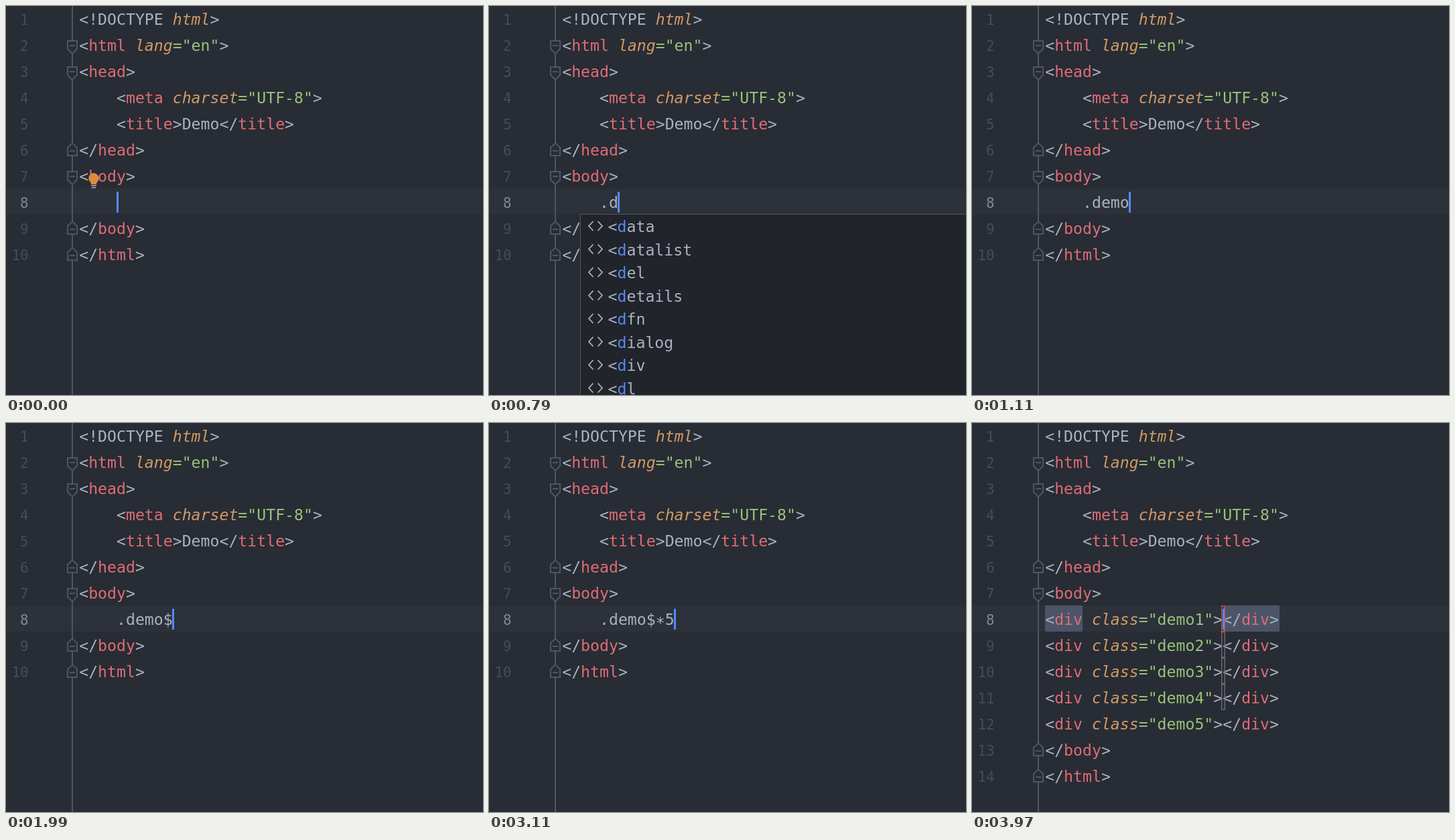
Animation of 712x580 px, one loop 4.37 s. Source, as an HTML page with a canvas:

```html
<!DOCTYPE html>
<html lang="en">
<head>
<meta charset="UTF-8">
<title>Abbreviation expansion</title>
<style>
html, body { margin: 0; width: 100%; height: 100%; overflow: hidden; background: #282c34; }
canvas { display: block; width: 712px; height: 580px; }
</style>
</head>
<body>
<canvas id="stage" width="712" height="580"></canvas>
<script>
const ctx = document.getElementById('stage').getContext('2d');
const W = 712, H = 580, LOOP = 4370;
const LEFT = 109.2, CELL = 13.95, ROW = 39, ACTIVE = 8;
const FACE = '"DejaVu Sans Mono", "Noto Sans Mono", monospace';
const FONT = '23.17px ' + FACE;
const COLOR = {
  bg: '#282c34', row: '#2c313a', text: '#abb2bf', tag: '#e06c75', attr: '#d19a66',
  string: '#98c379', caret: '#528bff', gutter: '#50555f', number: '#434d5c',
  activeNumber: '#7f8a93', popup: '#21242b', border: '#50545c', match: '#568af2',
  brace: '#4c5568', stop: '#6b6c6e', activeStop: '#cc4a42', bulb: '#db8b3b'
};

const HEAD = [
  '<!DOCTYPE html>', '<html lang="en">', '<head>', '    <meta charset="UTF-8">',
  '    <title>Demo</title>', '</head>', '<body>'
];
const TAIL = ['</body>', '</html>'];
const DIVS = [1, 2, 3, 4, 5].map(n => `<div class="demo${n}"></div>`);

const ALL_TAGS = ['a', 'abbr', 'address', 'area', 'article', 'aside', 'audio', 'b'];
const D_TAGS = ['data', 'datalist', 'del', 'details', 'dfn', 'dialog', 'div', 'dl'];
const DE_TAGS = ['del', 'details'];

const STEPS = [
  { at: 0, typed: '', caret: true, bulb: true },
  { at: 60, typed: '', bulb: true },
  { at: 260, typed: '.', caret: true },
  { at: 330, typed: '.', caret: true, tags: ALL_TAGS },
  { at: 790, typed: '.d', caret: true, tags: D_TAGS },
  { at: 850, typed: '.de', caret: true, tags: DE_TAGS },
  { at: 980, typed: '.dem', caret: true },
  { at: 1110, typed: '.demo', caret: true },
  { at: 1990, typed: '.demo$', caret: true },
  { at: 2060, typed: '.demo$' },
  { at: 2590, typed: '.demo$', caret: true },
  { at: 2650, typed: '.demo$*' },
  { at: 2710, typed: '.demo$*', caret: true },
  { at: 3110, typed: '.demo$*5', caret: true },
  { at: 3700, expanded: true, caret: true },
  { at: 3970, expanded: true, caret: true, braces: true }
];

const colX = col => LEFT + col * CELL;
const rowTop = line => (line - 1) * ROW - 1;

function rect(color, x, y, w, h) {
  ctx.fillStyle = color;
  ctx.fillRect(x, y, w, h);
}

function path(points, color, width, closed) {
  ctx.beginPath();
  points.forEach(([x, y]) => ctx.lineTo(x, y));
  if (closed) ctx.closePath();
  ctx.strokeStyle = color;
  ctx.lineWidth = width;
  ctx.stroke();
}

function cells(str, x, y, color, style = '') {
  ctx.font = style + FONT;
  ctx.fillStyle = color;
  [...str].forEach((ch, i) => {
    if (ch !== ' ') ctx.fillText(ch, x + i * CELL, ch === '*' ? y + 5 : y);
  });
}

function codeLine(src, line) {
  const y = rowTop(line) + 29;
  const put = (str, from, color, style) => cells(str, colX(from), y, color, style);
  let pos = 0;
  for (const m of src.matchAll(/(="[^"]*")|(?<=<\/?)(\w+)|(?<= )(\w+)/g)) {
    put(src.slice(pos, m.index), pos, COLOR.text);
    if (m[1]) put(m[0], m.index, COLOR.string);
    else if (m[2]) put(m[0], m.index, COLOR.tag);
    else put(m[0], m.index, COLOR.attr, 'italic ');
    pos = m.index + m[0].length;
  }
  put(src.slice(pos), pos, COLOR.text);
}

function lineNumber(n) {
  ctx.font = '20.8px ' + FACE;
  ctx.textAlign = 'right';
  ctx.fillStyle = n === ACTIVE ? COLOR.activeNumber : COLOR.number;
  ctx.fillText(n, 33.5, rowTop(n) + 29);
  ctx.textAlign = 'left';
}

function foldMark(line, opens) {
  const y = rowTop(line);
  const [flat, shoulder, tip] = opens ? [14, 26, 33] : [29, 17, 10.5];
  const shape = [[92, y + flat], [106, y + flat], [106, y + shoulder], [99, y + tip], [92, y + shoulder]];
  ctx.fillStyle = COLOR.bg;
  ctx.beginPath();
  shape.forEach(([px, py]) => ctx.lineTo(px, py));
  ctx.fill();
  path(shape, COLOR.gutter, 2, true);
  const mid = y + (opens ? 21 : 22);
  path([[95, mid], [103, mid]], COLOR.gutter, 2);
}

function bulb() {
  ctx.fillStyle = COLOR.bulb;
  ctx.beginPath();
  ctx.arc(131, 257, 7.7, Math.PI * 0.8, Math.PI * 2.2);
  ctx.lineTo(135, 264);
  ctx.lineTo(135, 266);
  ctx.lineTo(127, 266);
  ctx.lineTo(127, 264);
  ctx.fill();
  rect(COLOR.text, 127, 267, 8, 1.5);
  rect(COLOR.text, 128, 270, 6, 1.5);
}

function popup(tags, prefix) {
  const x = 136, y = 310;
  const h = tags.length < 8 ? tags.length * 34.5 + 4 : H;
  rect(COLOR.border, x, y, W, h);
  rect(COLOR.popup, x + 1, y + 1, W, h - 2);
  tags.forEach((tag, i) => {
    const base = 337 + i * 34.5, mid = base - 9;
    for (const side of [-1, 1]) {
      path([[159 + side * 3.5, mid - 7], [159 + side * 10, mid], [159 + side * 3.5, mid + 7]], COLOR.text, 1.8);
    }
    const n = prefix.length, left = 177.6;
    cells('<', left, base, COLOR.text);
    cells(tag.slice(0, n), left + CELL, base, COLOR.match);
    cells(tag.slice(n), left + (n + 1) * CELL, base, COLOR.text);
  });
}

function tabStop(line, color) {
  ctx.strokeStyle = color;
  ctx.lineWidth = 1.4;
  ctx.strokeRect(372.7, rowTop(line) + 0.7, 4.6, ROW - 1.4);
}

function draw(s) {
  const body = s.expanded ? DIVS : ['    ' + s.typed];
  const lines = [...HEAD, ...body, ...TAIL];
  const top = rowTop(ACTIVE);

  rect(COLOR.bg, 0, 0, W, H);
  rect(COLOR.row, 0, top, W, ROW);
  if (s.braces) {
    rect(COLOR.brace, 109, top, 56, ROW);
    rect(COLOR.brace, 375, top, 84, ROW);
  }
  rect(COLOR.gutter, 98, 0, 2, H);
  [2, 3, 7].forEach(n => foldMark(n, true));
  [6, lines.length - 1, lines.length].forEach(n => foldMark(n, false));
  lines.forEach((src, i) => {
    lineNumber(i + 1);
    codeLine(src, i + 1);
  });

  if (s.bulb) bulb();
  if (s.expanded) {
    [9, 10, 11].forEach(n => tabStop(n, COLOR.stop));
    tabStop(ACTIVE, COLOR.activeStop);
  }
  if (s.caret) {
    const col = s.expanded ? 19 : body[0].length;
    rect(COLOR.caret, Math.floor(colX(col)), top + 5, 3, 31);
  }
  if (s.tags) popup(s.tags, s.typed.slice(1));
}

const start = performance.now();
function tick() {
  const t = (performance.now() - start) % LOOP;
  draw(STEPS.findLast(s => s.at <= t));
  requestAnimationFrame(tick);
}
tick();
</script>
</body>
</html>
```
